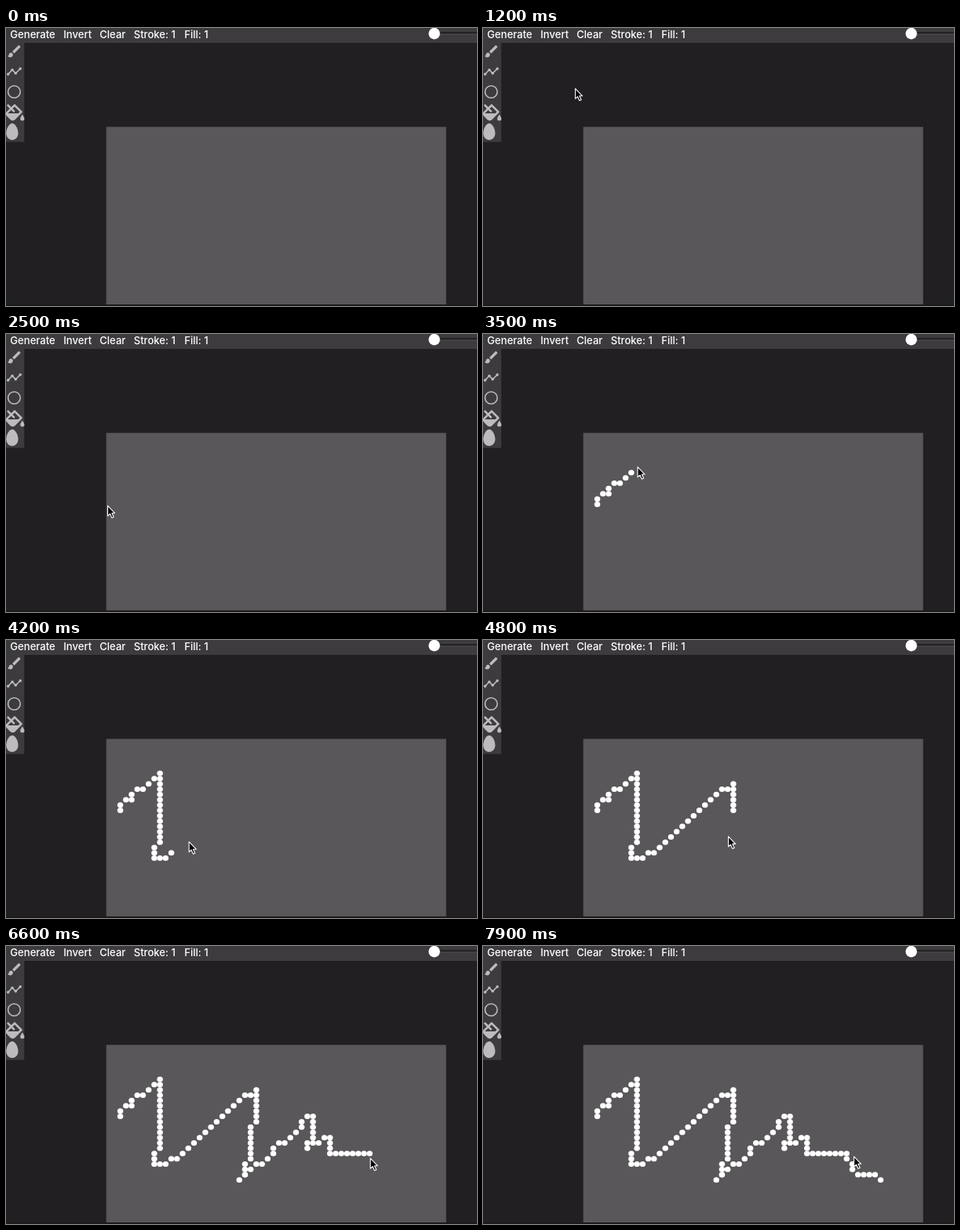
Recreate the animation shown at these times as an HTML page. Size 600 px wide and 355 px high, loop 8000 ms.

```html
<!DOCTYPE html>
<html lang="en">
<head>
<meta charset="utf-8">
<title>Drawing tool</title>
<style>
  html, body { margin: 0; width: 100%; height: 100%; overflow: hidden; background: #211f21; }
  svg { display: block; }
  text { font: 500 13.1px Inter, Roboto, sans-serif; fill: #fff; }
  .panel { fill: #3d3b3e; }
  .icon { fill: #bdbbbd; }
  .line { fill: none; stroke: #bdbbbd; stroke-width: 1.6; }
  #dots { fill: #fff; }
  #cursor { fill: #000; stroke: #fff; stroke-width: 1.1; stroke-linejoin: round; }
</style>
</head>
<body>
<svg width="600" height="355" viewBox="0 0 600 355">
  <rect x="127.7" y="126.3" width="433" height="226.7" fill="#595759"/>
  <rect class="panel" width="600" height="19"/>
  <rect class="panel" y="19" width="23.3" height="126.5"/>
  <rect y="353" width="600" height="2" fill="#1d191b"/>

  <text x="5.3" y="13">Generate</text>
  <text x="73.2" y="13">Invert</text>
  <text x="119.2" y="13">Clear</text>
  <text x="162.7" y="13">Stroke: 1</text>
  <text x="227.2" y="13">Fill: 1</text>

  <rect x="546" y="5" width="54" height="2.5" fill="#232123"/>
  <rect x="546" y="7.5" width="54" height="1" fill="#504e51"/>
  <circle cx="545.6" cy="7.1" r="7.3" fill="#fff"/>

  <!-- brush -->
  <path class="icon" transform="translate(.3 19.5) scale(.86)" d="M7 14c-1.7 0-3 1.3-3 3 0 1.3-1.2 2-2 2 .9 1.2 2.5 2 4 2 2.2 0 4-1.8 4-4 0-1.7-1.3-3-3-3zM20.7 4.6l-1.3-1.3c-.4-.4-1-.4-1.4 0L9 12.2 11.8 15l9-9c.4-.4.4-1 0-1.4z"/>
  <!-- polyline -->
  <path class="line" d="M2.700 59L8 53.500L12.300 57.800L18.200 52"/>
  <path class="line" style="stroke-width:3.600;stroke-linecap:round" d="M2.700 59h0M8 53.500h0M12.300 57.800h0M18.200 52h0"/>
  <!-- circle -->
  <circle class="line" cx="10.400" cy="81.500" r="7.800"/>
  <!-- paint bucket -->
  <g transform="translate(-.2 97.300) scale(.041)">
    <path class="icon" fill-rule="evenodd" d="M503 217L295 9c-12-12-33-12-45 0l-82 82L82 5c-6-6-16-6-23 0L37 27c-6 6-6 16 0 23l86 86-95 95c-37 37-37 98 0 136l117 117c37 37 98 37 136 0l222-222c12-12 12-32 0-45zM386 288H66c1-4 4-8 7-12l95-95 59 59c12 12 33 12 45 0s12-33 0-45l-59-59 59-59 162 162z"/>
    <path class="icon" d="M512 320s-64 93-64 128a64 64 0 0 0 128 0c0-35-64-128-64-128z"/>
  </g>
  <!-- egg -->
  <path class="icon" d="M7.900 121.700C11.800 121.700 15.500 128.500 15.500 134.300C15.500 139.500 12.200 143 7.900 143S.3 139.500 .3 134.300C.3 128.500 4 121.700 7.900 121.700z"/>

  <g id="dots"></g>
  <path id="cursor" d="M.6 .8V13.800L3.500 11.100L5.900 16.300L8.200 15.300L5.900 10.300H9.700z"/>
</svg>
<script>
const LOOP = 8000, STEP = 100, DRAW_START = 30, LEAVE = 79;

// Turning points of the stroke on the brush grid: column,row
const turns = ('0,7 0,6 2,5 2,4 4,3 7,0 7,13 6,14 6,16 8,16 10,15 22,3 23,3 24,2 23,15 22,16 22,18 ' +
  '21,19 24,16 25,16 27,14 27,13 29,12 32,9 32,8 34,7 34,11 33,13 35,12 37,11 37,14 44,14 ' +
  '46,18 49,18 50,19').split(' ').map(p => p.split(',').map(Number));

// Pace of the stroke: step, dots drawn
const pace = [[30, 1], [35, 9], [38, 12], [40, 24], [47, 44], [50, 59], [54, 68], [57, 81], [65, 95], [73, 104]];

// Pointer before the stroke: step, x, y
const approach = [[1, 382, 236], [2, 353, 210], [5, 353, 210], [12, 117, 76.5], [14, 54, 52],
  [17, 3, 21.5], [21, 3, 21.5], [25, 129, 218.5], [27, 143, 217]];

const lerp = (a, b, k) => a + (b - a) * k;
const snap = v => Math.ceil(v - 0.5);
const toXY = ([col, row]) => [145.6 + col * 7.22, 170.3 + row * 6.76];

// Values of a key list at a step, held before the first and after the last key
function sample(keys, step) {
  const i = keys.findIndex(key => key[0] >= step);
  if (i <= 0) return keys.at(i).slice(1);
  const [a, b] = [keys[i - 1], keys[i]];
  const k = (step - a[0]) / (b[0] - a[0]);
  return a.slice(1).map((v, j) => lerp(v, b[j + 1], k));
}

// Fill the grid cells between turning points
const cells = [turns[0]];
turns.slice(1).forEach(([x1, y1], i) => {
  const [x0, y0] = turns[i];
  const n = Math.max(Math.abs(x1 - x0), Math.abs(y1 - y0));
  for (let k = 1; k <= n; k++) cells.push([snap(lerp(x0, x1, k / n)), snap(lerp(y0, y1, k / n))]);
});

const group = document.getElementById('dots');
const cursor = document.getElementById('cursor');
const dots = cells.map(cell => {
  const [cx, cy] = toXY(cell);
  const dot = document.createElementNS('http://www.w3.org/2000/svg', 'ellipse');
  Object.entries({ cx, cy, rx: 3.75, ry: 3.5 }).forEach(([name, v]) => dot.setAttribute(name, v));
  return group.appendChild(dot);
});

const dotCount = step => step < DRAW_START ? 0 : Math.floor(sample(pace, step)[0]);

function cursorAt(step) {
  if (step < DRAW_START) return sample(approach, step);
  if (step >= LEAVE) return [472, 268];
  // The stroke trails the pointer by one step
  const [x, y] = toXY(cells[dotCount(step + 1) - 1]);
  return [x + 0.3, y - 1.3];
}

function render(now) {
  const step = Math.floor(now % LOOP / STEP);
  const count = dotCount(step);
  dots.forEach((dot, i) => dot.style.display = i < count ? '' : 'none');
  cursor.style.display = step ? '' : 'none';
  cursor.setAttribute('transform', `translate(${cursorAt(step)})`);
  requestAnimationFrame(render);
}
render(performance.now());
</script>
</body>
</html>
```
